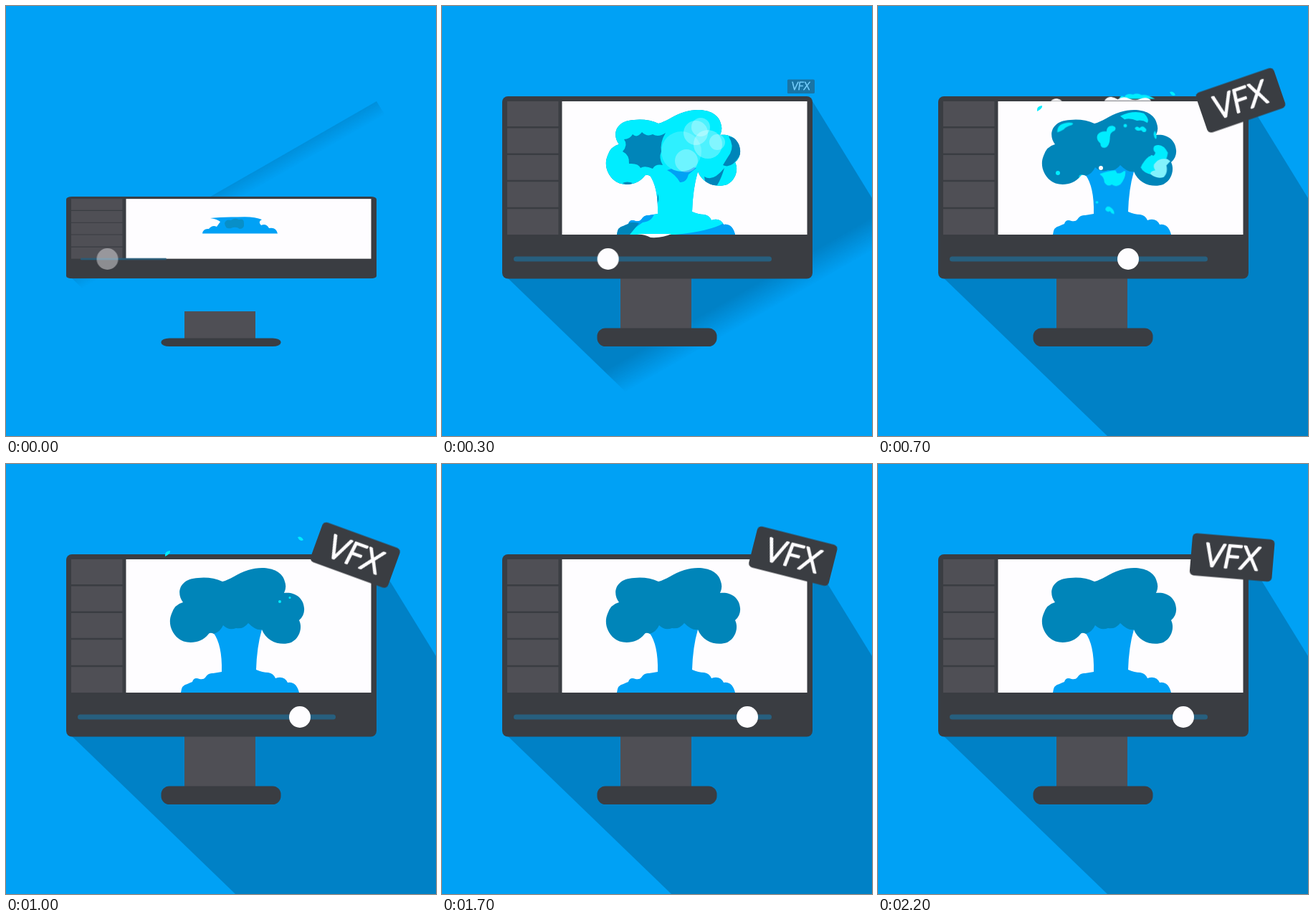
Write an HTML page without scripts that moves like this. It is 600 px wide and 600 px high and loops after 2.3 s.

```html
<!DOCTYPE html>
<html lang="en">
<head>
<meta charset="utf-8">
<title>VFX monitor</title>
<style>
html, body { margin: 0; width: 100%; height: 100%; overflow: hidden; background: #00a1f5; }
svg { display: block; width: 100vw; height: 100vh; }

.dark { fill: #3a3d42; }
.grey { fill: #4f4f55; }
.white { fill: #fefdff; }
.blue { fill: #00a1f5; }
.teal { fill: #0085b9; }
.cyan { fill: #00edff; }
.glow { fill: #fff; fill-opacity: .3; }

/* one loop is 23 held poses of 100 ms, 4.348% each */
.anim { animation: 2.3s step-end infinite; }
.shadow { animation-name: spread; }
.monitor { animation-name: rise; transform-origin: 0 380px; }
.stand { animation-name: rise; transform-origin: 0 475px; }
.track { animation-name: stretch; transform-origin: 106px 353px; }
.knob { animation-name: slide; }
.seed { animation-name: seed; }
.cloud { animation-name: grow; transform-origin: 327px 319px; }
.fire { animation-name: burn; }
.hole { animation-name: open; transform-origin: 282px 202px; }
.spill { animation-name: spill; }
.bits > * { animation: melt 2.3s step-end infinite; transform-box: fill-box; transform-origin: center; }
.spark { animation-name: fly; }
.badge { animation-name: swing; transform-origin: 503px 103px; }

.badge text {
  font: italic 300 45px Lato, "Open Sans", sans-serif;
  text-anchor: middle;
  fill: #fefdff;
  stroke: #fefdff;
  stroke-width: 2.6;
  stroke-linejoin: round;
}

@keyframes spread {
  0% { transform: translateX(22px); }
  4.34% { transform: translateX(75px); }
  8.69% { transform: translateX(145px); }
  13.04% { transform: translateX(222px); }
  17.39% { transform: translateX(340px); }
  21.73%, to { transform: translateX(500px); }
}
@keyframes rise {
  0% { transform: scaleY(.449); }
  4.34% { transform: scaleY(.8); }
  8.69% { transform: scaleY(.97); }
  13.04%, to { transform: none; }
}
@keyframes stretch {
  0% { transform: scale(.333); }
  4.34% { transform: scale(.75); }
  8.69% { transform: scale(.95); }
  13.04%, to { transform: none; }
}
@keyframes slide {
  0% { transform: translateX(141.5px); opacity: .42; }
  4.34% { transform: translateX(170px); opacity: .8; }
  8.69% { transform: translateX(200px); opacity: 1; animation-timing-function: steps(3); }
  21.73% { transform: translateX(295px); }
  26.08% { transform: translateX(323px); }
  30.43% { transform: translateX(349px); }
  34.78% { transform: translateX(372px); }
  39.13% { transform: translateX(393px); }
  43.47% { transform: translateX(410px); }
  47.82% { transform: translateX(419px); }
  52.17% { transform: translateX(424px); }
  56.52%, to { transform: translateX(426px); opacity: 1; }
}
@keyframes seed {
  0% { opacity: 1; }
  4.34%, to { opacity: 0; }
}
@keyframes grow {
  0% { transform: scale(0); }
  4.34% { transform: scale(.82, .65); }
  8.69% { transform: scale(.97, .93); }
  13.04%, to { transform: none; }
}
@keyframes burn {
  0% { opacity: 1; }
  21.73%, to { opacity: 0; }
}
@keyframes open {
  0% { transform: scale(.3); }
  8.69% { transform: scale(.7); }
  13.04% { transform: none; }
  17.39%, to { transform: scale(1.5); }
}
@keyframes spill {
  0% { opacity: 0; }
  13.04% { opacity: 1; }
  17.39%, to { opacity: 0; }
}
@keyframes melt {
  0% { transform: scale(0); }
  21.73% { transform: none; animation-timing-function: steps(5); }
  43.47%, to { transform: scale(0); }
}
@keyframes fly {
  0% { transform: translate(0, 30px); opacity: 0; }
  30.43% { transform: translate(0, 18px); opacity: 1; animation-timing-function: steps(3); }
  43.47% { transform: none; opacity: 1; }
  47.82% { transform: translate(0, -4px) ; opacity: 1; }
  52.17%, to { opacity: 0; }
}
@keyframes swing {
  0% { transform: scale(0); opacity: 0; }
  13.04% { transform: scale(.333); opacity: .45; }
  17.39% { transform: rotate(-3deg) scale(.75); opacity: 1; }
  21.73% { transform: rotate(-11.8deg); opacity: 1; }
  26.08% { transform: rotate(-22deg); }
  30.43% { transform: rotate(-19deg); }
  34.78% { transform: rotate(-2deg); }
  39.13% { transform: rotate(15deg); }
  43.47% { transform: rotate(20deg); }
  47.82% { transform: rotate(7deg); }
  52.17% { transform: rotate(-13deg); }
  56.52% { transform: rotate(-20.5deg); }
  60.86% { transform: rotate(-13.6deg); }
  65.21% { transform: rotate(3deg); }
  69.56% { transform: rotate(16deg); }
  73.91% { transform: rotate(14.2deg); }
  78.26% { transform: rotate(2deg); }
  82.6% { transform: rotate(-10deg); }
  86.95% { transform: rotate(-12deg); }
  91.3% { transform: rotate(-5deg); }
  95.65%, to { transform: rotate(4.8deg); opacity: 1; }
}
</style>
</head>
<body>
<svg viewBox="0 0 600 600" xmlns="http://www.w3.org/2000/svg">
  <defs>
    <linearGradient id="fade" gradientUnits="userSpaceOnUse" x1="-40" y1="0" x2="0" y2="0">
      <stop offset="0" stop-color="#0081c6"/>
      <stop offset="1" stop-color="#0081c6" stop-opacity="0"/>
    </linearGradient>
    <clipPath id="cast"><path d="M517 133L600 268V600H320L90 378Z"/></clipPath>
    <path id="head" d="M302 164C312 162 322 153 338 148C360 141 385 146 389 164Q392 172 388 180C402 178 415 186 416 201Q417 211 409 218C414 228 410 243 398 249C384 254 364 249 357 231Q349 233 338 222Q331 231 321 229Q311 233 303 225Q299 234 290 237Q284 234 282 238C272 251 250 252 240 243C230 234 226 221 231 209Q235 196 247 193C237 180 242 160 268 159Q286 157 302 164Z"/>
    <path id="stem" d="M244 319Q245 308 253 307Q257 305 260 304Q262 297 270 300Q276 301 278 298Q282 291 289 292L301 290Q302 252 289 235L303 222H350L357 231Q350 255 349 287Q358 291 366 291Q373 292 376 299Q388 295 393 305Q405 303 409 319Z"/>
    <clipPath id="shape"><use href="#head"/><use href="#stem"/></clipPath>
  </defs>

  <g clip-path="url(#cast)">
    <g transform="translate(303.5 255.5) rotate(60.15)">
      <rect class="shadow anim" x="-1000" y="-600" width="1000" height="1200" fill="url(#fade)"/>
    </g>
  </g>

  <g class="stand anim">
    <rect class="grey" x="249" y="366" width="99" height="90"/>
    <rect class="dark" x="216.5" y="449.5" width="167" height="25.5" rx="11.5"/>
  </g>

  <g class="monitor anim">
    <rect class="dark" x="84" y="126" width="433" height="254.5" rx="8"/>
    <rect class="grey" x="91" y="133" width="71.5" height="186"/>
    <path d="M91 169.2H163M91 206.7H163M91 244H163M91 282H163" stroke="#3a3d42" stroke-width="2.6"/>
    <rect class="white" x="167.5" y="133" width="342" height="186"/>

    <g class="cloud anim">
      <use class="blue" href="#stem"/>
      <use class="teal" href="#head"/>

      <g class="fire anim">
        <g clip-path="url(#shape)">
          <rect class="cyan" x="225" y="140" width="195" height="180"/>
          <path class="blue" d="M240 320V285H297Q296 300 280 302L256 319ZM325 319Q375 314 393 303L412 302V320Z"/>
          <path class="teal" d="M240 320L248 305Q262 300 275 303L262 319ZM400 182Q420 185 416 208Q404 228 392 222Q398 212 402 206Q408 195 400 182ZM366 238Q378 246 394 226Q390 240 384 250L368 250ZM301 262Q304 270 300 276ZM252 247Q258 244 266 247L260 251Z"/>
          <path class="blue" d="M314 229Q326 235 332 246Q341 247 344 235L355 226L338 222Z"/>
          <path class="hole anim teal" d="M254 186Q262 186 266 179Q272 185 279 176Q286 183 294 179Q302 184 312 177Q304 190 306 203Q302 212 308 222Q298 220 294 227Q283 222 277 226Q274 219 261 220Q262 208 252 203Q260 194 254 186Z"/>
          <circle class="cyan" cx="334" cy="203" r="28"/>
          <g class="glow">
            <circle cx="334" cy="203" r="28" fill-opacity=".18"/>
            <circle cx="354" cy="177" r="17"/>
            <circle cx="371" cy="193" r="20"/>
            <circle cx="384" cy="190" r="11"/>
            <circle cx="341" cy="216" r="16"/>
            <circle cx="361" cy="169" r="13"/>
          </g>
        </g>
      </g>

      <g clip-path="url(#shape)">
        <g class="bits cyan">
          <path d="M243 181Q241 160 270 158Q285 159 276 164Q262 168 258 174Q250 179 243 181Z"/>
          <path d="M298 178Q304 169 319 170Q320 156 333 157Q344 160 338 168Q326 172 327 186Q326 206 315 208Q304 208 305 198Q294 190 298 178Z"/>
          <path d="M325 152Q355 138 380 146Q394 160 388 168Q376 160 364 163Q348 156 335 160Z"/>
          <circle cx="345" cy="167" r="4"/>
          <path d="M353 169Q358 163 364 169Q371 162 377 169Q382 172 378 178Q372 180 368 174Q356 178 353 169Z"/>
          <path d="M386 170Q393 184 388 190Q380 180 386 170Z"/>
          <path d="M386 182Q405 174 417 198Q415 214 408 220Q412 232 404 246L384 250Q360 246 354 232Q361 216 374 206Q386 208 388 198Q380 190 386 182Z"/>
          <path fill="#83f2fc" d="M384 212Q392 202 410 205L417 210L408 220Q412 236 402 247Q385 252 371 240Q370 233 382 231Q374 220 384 212Z"/>
          <path class="teal" d="M396 240Q406 242 412 226L410 244L400 249Z"/>
          <path d="M298 230Q330 218 357 224Q358 240 345 255Q335 262 325 255Q316 262 308 250Q308 238 298 232Z"/>
          <path class="blue" d="M327 229Q334 230 338 222L348 229Q341 238 331 236Z"/>
          <circle class="white" cx="311" cy="226" r="5"/>
          <circle cx="305.500" cy="274" r="3"/>
          <path d="M313 284Q314 274 323 277Q334 284 334 293Q328 295 324 287Q318 291 313 284Z"/>
          <circle cx="251" cy="233" r="5"/>
          <circle cx="284" cy="239" r="6"/>
        </g>
      </g>
    </g>
  </g>

  <path class="spill anim white" d="M272 318Q284 319 291 323Q308 324 320 318Z"/>

  <g class="bits">
    <path class="cyan" d="M320 132Q323 122 332 127Q338 118 352 122Q362 117 372 123Q386 121 403 132Z"/>
    <path class="white" d="M236 134Q240 128 250 128Q258 129 262 134Z"/>
    <path class="white" d="M294 134Q300 125 310 125Q318 126 325 131Q338 122 352 129Q366 135 376 130Q394 123 403 134Z"/>
  </g>

  <g class="spark anim cyan">
    <path d="M222 128Q221 122 229 121Q230 125 222 129Z"/>
    <path d="M407 102Q412 100 415 106Q410 109 407 102Z"/>
    <circle cx="382" cy="192" r="2"/>
    <circle cx="396" cy="186.500" r="1.500"/>
  </g>

  <g class="seed anim">
    <path class="blue" d="M274 317.500Q275 310 283 311Q288 305 294 308L299 301Q294 297 285 296Q300 294 323 294.500Q346 293 357 298Q351 301 356 306Q363 303 367 310Q377 308 379 317.500Z"/>
    <path fill="#088fc8" d="M305 303Q307 297 314 299Q319 295 325 298Q332 296 332 303Q333 311 326 311Q321 307 314 310Q306 312 305 303Z"/>
  </g>

  <rect class="track anim" x="100" y="349.500" width="360" height="7" rx="3.500" fill="#275f7e"/>
  <circle class="knob anim white" cx="0" cy="353" r="15"/>

  <g class="badge anim">
    <rect class="dark" x="439" y="101.500" width="115" height="59" rx="6"/>
    <text x="496" y="146">VFX</text>
  </g>
</svg>
</body>
</html>
```
